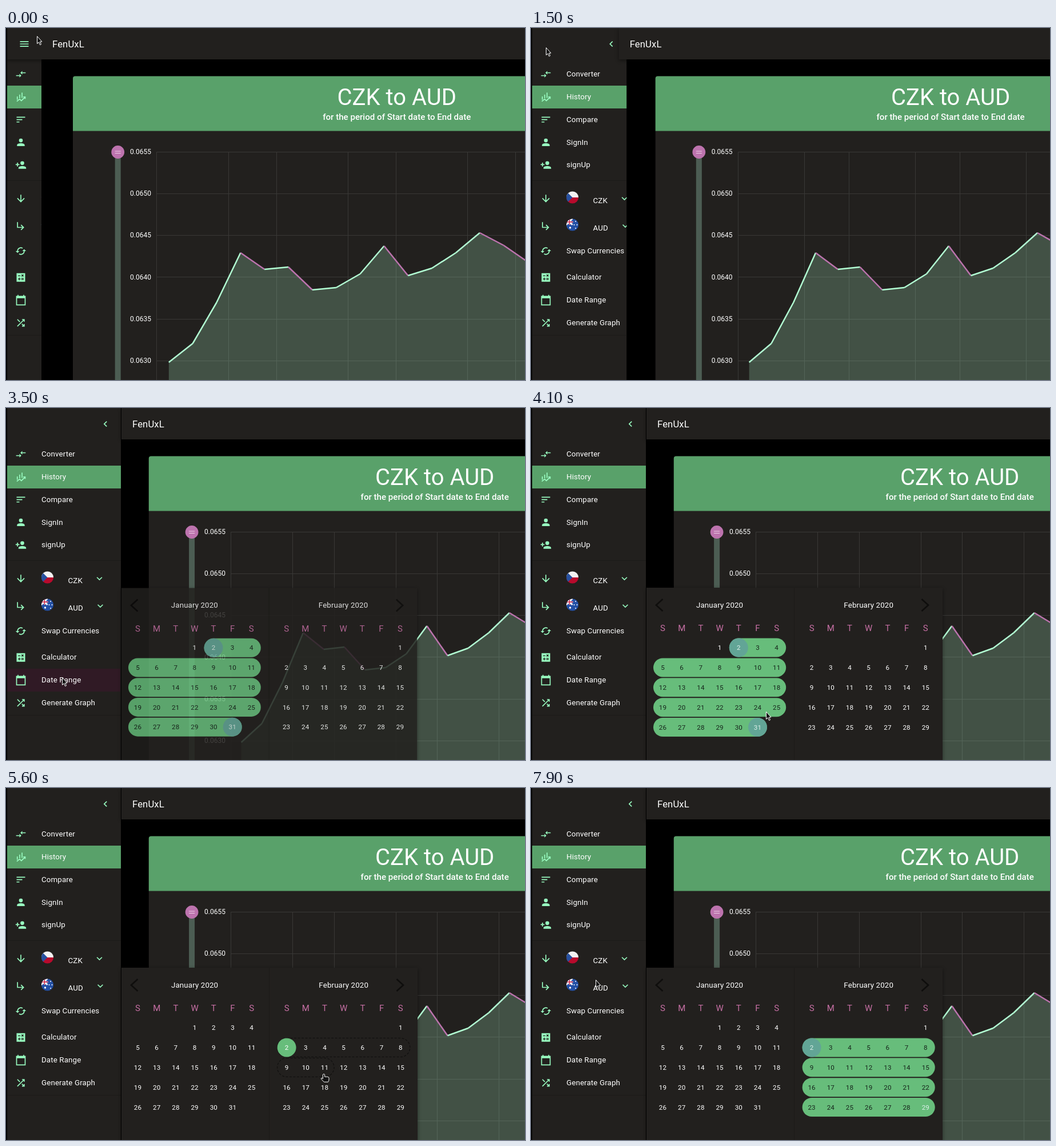
Write an HTML page that moves like this. It is 908 px wide and 617 px high and loops after 8 s.

```html
<!DOCTYPE html>
<html lang="en">
<head>
<meta charset="utf-8">
<title>Currency history</title>
<style>
html, body { margin: 0; width: 100%; height: 100%; overflow: hidden; background: #000; }
svg { display: block; }
text { font-family: Roboto, Arial, sans-serif; fill: #fff; }
.body { font-size: 13.33px; letter-spacing: .00938em; }
.mid { text-anchor: middle; }
.bar, .panel { filter: drop-shadow(0 2px 3px rgba(0,0,0,.45)); }
</style>
</head>
<body>
<svg id="stage" width="100%" height="100%" viewBox="0 0 908 617"></svg>
<script>
const LOOP = 8000, STEP = 100;
const DARK = '#22201e', GREEN = '#59a16a', MINT = '#98fcc0', LINE = '#b2fdd3', PINK = '#bd73ae';
const RANGE = '#67bd7b', TEAL = '#62a596';
const COL = 33.2, ROW = 34.85, TOP = 420.1, ITEM = 39.8;
const JAN = { x: 230.5, skip: 3, days: 31, name: 'January 2020' };
const FEB = { x: 491.1, skip: 6, days: 29, name: 'February 2020' };

// Icons on a 24 unit grid: stroke, fill, cut-out
const bust = x => `M${x - 4} 8a4 4 0 1 0 8 0a4 4 0 1 0-8 0M${x - 8} 20v-2c0-5.3 16-5.3 16 0v2z`;
const ICON = {
  menu: ['M3 7H21M3 12H21M3 17H21'],
  left: ['M14.7 6.7L9.4 12l5.3 5.3'],
  more: ['M6.7 9.3L12 14.6l5.3-5.3'],
  convert: ['M2 15H9M22 9H15', 'M9 11l4 4-4 4zM15 5l-4 4 4 4z'],
  history: ['M4.5 11V18M9.5 7V14.5M14.5 3V14M3.5 21.5L9.5 16.5 13 20 21 12.5M17 12H21V16'],
  compare: ['M3 7H21M3 12H15M3 17H9'],
  person: ['', bust(12)],
  add: ['M1 11H9M5 7V15', bust(15)],
  down: ['M12 4V18M4.7 11.3L12 18.6l7.3-7.3'],
  turn: ['M5 4V15H17M12.3 9.7L17.6 15l-5.3 5.3'],
  swap: ['M5 12A7 7 0 0 1 15.6 6M19 12A7 7 0 0 1 8.4 18', 'M1 12h8l-4 4zM15 12h8l-4-4z'],
  calc: ['M4 4H20V20H4z', 'M4 4H20V20H4z', 'M6 8.5h5M13.5 6l4 4m0-4l-4 4M6 15.3h5.5M8.7 12.5V18M13 14h5M13 16.5h5'],
  date: ['M3 4H21V22H3zM6 1V4M18 1V4', 'M3 4H21V8H3z'],
  shuffle: ['M4.7 19.3L19 5M4.7 4.7l5.2 5.2M14.1 14.1l5 5M14.5 5H19V9.5M14.5 19H19V14.5']
};
// Sidebar blocks: top row, then evenly spaced items
const PAGES = { convert: 'Converter', history: 'History', compare: 'Compare', person: 'SignIn', add: 'signUp' };
const TOOLS = { calc: 'Calculator', date: 'Date Range', shuffle: 'Generate Graph' };
const RATES = [586, 553, 481, 394, 423, 419, 459, 455, 431, 382, 434, 421, 394, 359, 381, 410];

// Pointer legs: start, end, x, y
const LEGS = [
  [0, 0, 54, 14], [100, 300, 74, 9], [300, 600, 26, 34], [1800, 2400, 114, 465], [2700, 2800, 103, 465],
  [3300, 3400, 98, 472], [3900, 4100, 411, 532], [4200, 4500, 519, 521], [4500, 4600, 499, 503],
  [4700, 5000, 486, 457], [5300, 5600, 556, 501], [5600, 5800, 750, 556], [5800, 6100, 695, 562],
  [6900, 7200, 175, 365], [7300, 7900, 113, 336]
];

const ramp = (t, from, to) => Math.min(1, Math.max(0, (t - from) / (to - from || 1)));
const ease = (t, from, to) => { const k = ramp(t, from, to); return k * k * (3 - 2 * k); };
function pointerAt(t) {
  let x = LEGS[0][2], y = LEGS[0][3];
  for (const [from, to, tx, ty] of LEGS) {
    const k = ease(t, from, to);
    x += (tx - x) * k;
    y += (ty - y) * k;
  }
  return [x, y];
}

const rect = (x, y, w, h, fill, more = '') => `<rect x="${x}" y="${y}" width="${w}" height="${h}" fill="${fill}" ${more}/>`;
const disc = (x, y, r, fill, more = '') => `<circle cx="${x}" cy="${y}" r="${r}" fill="${fill}" ${more}/>`;
const path = (d, more) => `<path d="${d}" ${more}/>`;
const stroke = (d, color, w = 1) => path(d, `fill="none" stroke="${color}" stroke-width="${w}"`);
const text = (x, y, s, more = 'class="body"') => `<text x="${x}" y="${y}" ${more}>${s}</text>`;
function icon(name, x, y) {
  const [line, solid = '', cut = ''] = ICON[name];
  return `<g transform="translate(${x - 10} ${y - 10}) scale(.8333)">` +
    stroke(line, MINT, 2) + path(solid, `fill="${MINT}"`) + stroke(cut, DARK, 1.5) + '</g>';
}

function flag(id, y, art) {
  return `<clipPath id="${id}"><circle r="10.6"/></clipPath>
    <g transform="translate(72.5 ${y})"><g clip-path="url(#${id})">${art}</g></g>`;
}
const czech = rect(-11, -11, 22, 11, '#f2f2f2') + rect(-11, 0, 22, 11, '#b80a2c') + path('M-11-11L0 0-11 11z', 'fill="#27509f"');
const cross = 'M-5-11V0M-11-5H1';
const australia = rect(-11, -11, 22, 22, '#2350a5') + stroke(cross + 'M-11-11L0 0M0-11L-11 0', '#fff', 2.5) + stroke(cross, '#cc1c3c', 1.4) +
  disc(-4, 5, 1.7, '#fff') + [0, 1, 2, 3].map(i => disc(5.5 + 2.5 * Math.sin(i * 1.57), 6 * Math.cos(i * 1.57), 1, '#fff')).join('');

function chart(p) {
  const left = 263.9 + 129.7 * p, gap = 41.85 - 5.77 * p ** 2.3;
  const card = 117 + 132.8 * p, mid = (card + 1250.5) / 2, knob = 195.7 + 129.4 * p;
  const px = i => left + gap * (i + .5);
  let s = rect(card, 84.6, 1000, 540, DARK, 'rx="4"') +
    path(`M${card} 180.4V88.6q0-4 4-4H908V180.4z`, `fill="${GREEN}"`) +
    text(mid, 135, 'CZK to AUD', 'class="mid" font-size="40"') +
    text(mid, 161, 'for the period of Start date to End date', 'class="mid" font-size="15.1" font-weight="500"');
  let grid = '';
  for (let i = 0; i < 6; i++) {
    const y = 217 + 73.3 * i;
    grid += `M${left} ${Math.floor(y) + .5}H908`;
    s += text(254 + 130 * p, y + 3.8, (.0655 - i * .0005).toFixed(4), 'text-anchor="end" font-size="12"');
  }
  // Vertical lines alternate three and two days apart
  for (let i = -.5, wide = true; i < 15; i += wide ? 3 : 2, wide = !wide)
    grid += `M${Math.floor(px(i)) + .5} 217V617`;
  s += stroke(grid, '#393836');
  const pts = RATES.map((y, i) => `${px(i)} ${y}`);
  s += path(`M${px(0)} 617L${pts.join('L')}V617z`, `fill="${LINE}" fill-opacity=".22"`);
  for (let i = 1; i < pts.length; i++)
    s += stroke(`M${pts[i - 1]}L${pts[i]}`, RATES[i] < RATES[i - 1] ? LINE : PINK, 2.5);
  return s + rect(knob - 5, 217, 10, 400, '#4c5d53') + disc(knob, 217.5, 11.4, PINK) +
    stroke(`M${knob - 5} 216h10m-10 3.5h10`, '#ecd3e6');
}

function sidebar(p, t) {
  const w = 60 + 139 * p, r = 110 * ease(t, 3000, 3300), fade = 1 - ramp(t, 3500, 3900);
  let s = rect(2, 0, w, 617, DARK) + rect(2, 101, w, 40, GREEN) +
    rect(2, 267, w, 1, '#1b1a18') + rect(2, 538, w, 1, '#1b1a18') +
    `<svg x="2" y="457" width="198" height="40">${disc(101, 16, r, '#301a25', `opacity="${fade}"`)}</svg>`;
  const item = (name, y, label) => icon(name, 26, y) + text(62, y + 4.2, label);
  const block = (items, top) => Object.keys(items).forEach((name, i) => s += item(name, top + i * ITEM, items[name]));
  block(PAGES, 81);
  block(TOOLS, 437.2);
  s += item('down', 299, '') + item('turn', 347, '') + item('swap', 391, 'Swap Currencies') +
    flag('cz', 297, czech) + flag('au', 345, australia) + text(108.5, 307, 'CZK') + text(108.5, 355, 'AUD') +
    icon('more', 163.5, 299) + icon('more', 165, 347) + icon('left', w - 25, 28);
  return `<clipPath id="drawer"><rect x="2" width="${w}" height="617"/></clipPath><g clip-path="url(#drawer)">${s}</g>`;
}

function appBar(p) {
  const x = 2 + 200 * p;
  return `<g class="bar">${rect(x, 0, 908 - x, 55, DARK)}</g>` + (p ? '' : icon('menu', 32, 28)) +
    text(p ? x + 19 : 81, 34, 'FenUxL', 'font-size="16.67" letter-spacing=".125"');
}

function spot(m, day) {
  const i = day + m.skip - 1;
  return [m.x + i % 7 * COL, TOP + Math.floor(i / 7) * ROW];
}
const dot = (m, day, fill, more) => disc(...spot(m, day), 16.5, fill, more);

// One rounded bar per week from day a to day b
function weeks(m, a, b, more = '') {
  let s = '';
  for (let d = a; d <= b;) {
    const end = Math.min(b, d + 6 - (d + m.skip - 1) % 7), [x, y] = spot(m, d);
    s += rect(x - 16.5, y - 16.5, (end - d) * COL + 33, 33, RANGE, 'rx="16.5" ' + more);
    d = end + 1;
  }
  return s;
}

// Days from..to stand on a filled range, with pale ends
function month(m, from, to) {
  let s = text(m.x + 3 * COL, 349.8, m.name, 'class="body mid"');
  [...'SMTWTFS'].forEach((c, i) => s += text(m.x + i * COL, 391.3, c, 'class="mid" font-size="15" style="fill:#c66fa4"'));
  for (let d = 1; d <= m.days; d++) {
    const [x, y] = spot(m, d), ink = d > from && d < to ? '#17261c' : d === from || d === to ? '#dcefe9' : '#fff';
    s += text(x, y + 4.1, d, `class="mid" font-size="11.67" letter-spacing=".1" style="fill:${ink}"`);
  }
  return s;
}

// February day under the pointer, or 0
function hovered(x, y) {
  for (let d = 1; d <= FEB.days; d++) {
    const [cx, cy] = spot(FEB, d);
    if (Math.hypot(x - cx, y - cy) < 16.5) return d;
  }
  return 0;
}

function popup(t, mx, my) {
  const o = ramp(t, 3300, 3535), k = .75 + .25 * ease(t, 3300, 3510);
  if (!o) return '';
  const day = hovered(mx, my), first = t < 5300, done = ramp(t, 6200, 6500);
  let s = `<g class="panel">${rect(202, 315, 518, 324, DARK)}</g>` + rect(460, 315, 1, 302, '#1b1a18') +
    stroke('M230.5 335L219 345.5 230.5 356M683.5 335L695 345.5 683.5 356', '#0f0e0d', 2.7);
  if (first) {
    s += weeks(JAN, 2, 31) + dot(JAN, 2, TEAL) + dot(JAN, 31, TEAL);
    if (day && t > 4100) s += dot(FEB, day, 'none', 'stroke="#c9c8c7"');
  } else {
    if (done < 1) s += weeks(FEB, 2, day || 2, 'fill-opacity="0" stroke="#121110" stroke-width="1.3" stroke-dasharray="4 2.5"');
    s += weeks(FEB, 2, 29, `opacity="${done}"`) + dot(FEB, 2, done ? TEAL : RANGE);
  }
  s += month(JAN, ...(first ? [2, 31] : [])) + month(FEB, ...(done > .5 ? [2, 29] : []));
  return `<g opacity="${o}" transform="translate(202 477) scale(${k} ${k * k}) translate(-202 -477)">${s}</g>`;
}

function pointer(t, x, y) {
  const hand = t >= 600 && t < 1300 || t >= 2000 && t < 3400 || t > 4100 && t < 7000 && hovered(x, y);
  const d = hand
    ? 'M-1.6 1.2Q0-.8 1.6 1.2V5.2H7Q9 5.6 9 7.6V10Q9 12.5 7.6 14.3H.4L-4.5 9.2Q-5 7-3 7.4L-1.6 8.6z'
    : 'M.5.5V13.5L3.4 10.8 5.5 15.6 7.5 14.7 5.5 10H9z';
  return path(d, `fill="#111" stroke="#fff" transform="translate(${x} ${y})"`);
}

const stage = document.getElementById('stage');
let last = -1;
function frame() {
  const t = Math.floor(performance.now() % LOOP / STEP) * STEP;
  if (t !== last) {
    last = t;
    const p = ease(t, 1296, 1596), [x, y] = pointerAt(t);
    stage.innerHTML = rect(0, 0, 908, 617, '#000') + chart(p) + sidebar(p, t) + appBar(p) + popup(t, x, y) + pointer(t, x, y);
  }
  requestAnimationFrame(frame);
}
frame();
</script>
</body>
</html>
```
